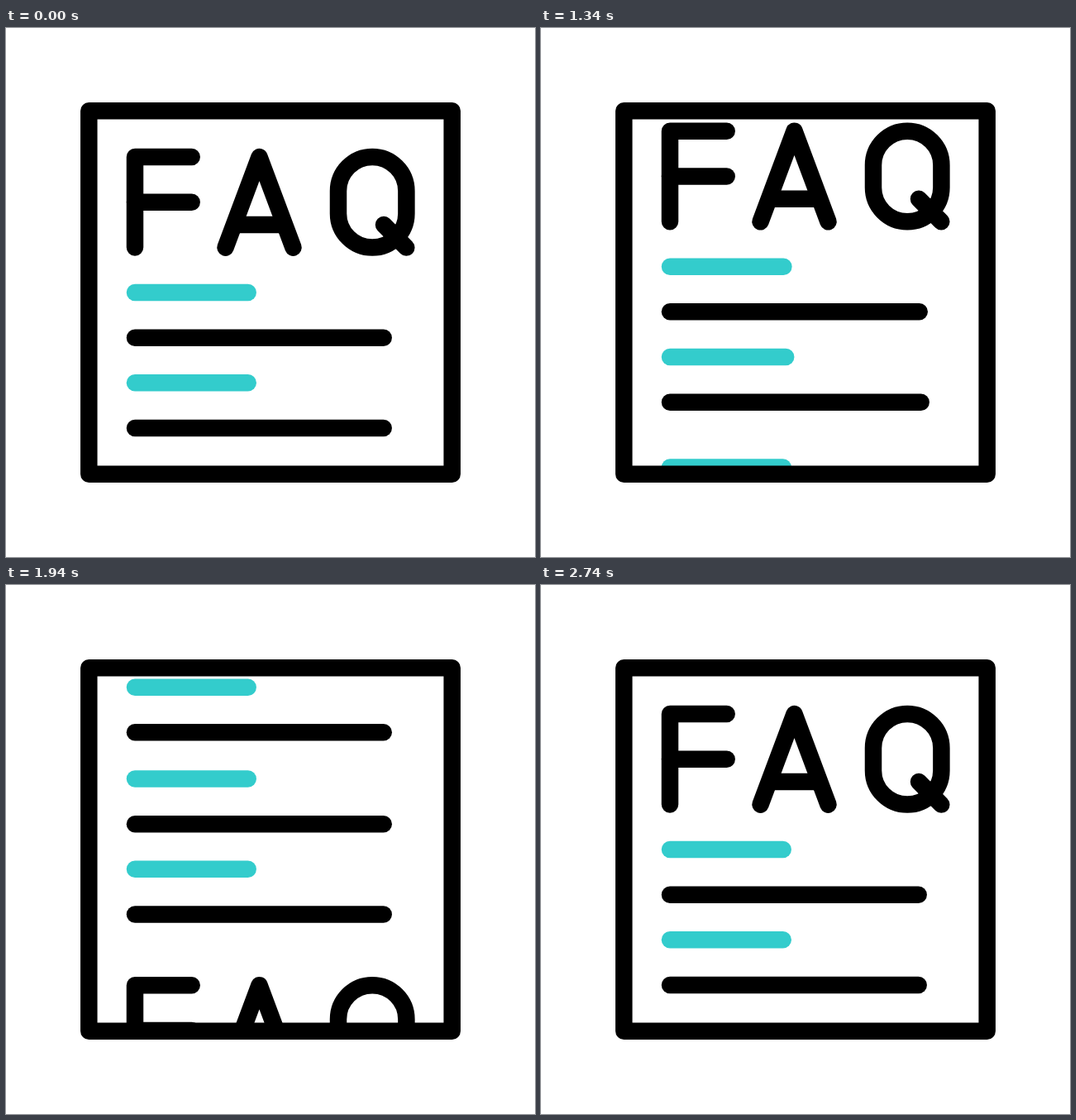
Animation of 640 by 640 pixels, one loop 3.02 s. Source, as an HTML page with a canvas:

```html
<!DOCTYPE html>
<html lang="en">
<head>
<meta charset="utf-8">
<title>FAQ page</title>
<style>
  html, body { margin: 0; width: 100%; height: 100%; overflow: hidden; background: #fff; }
  canvas { display: block; width: 640px; height: 640px; }
</style>
</head>
<body>
<canvas id="stage" width="640" height="640"></canvas>
<script>
const ctx = document.getElementById('stage').getContext('2d');
const LOOP = 3020, STEP = 20, INTRO_START = 60;
const BLACK = '#000', TEAL = '#33cccc';
const LEFT = 156, PITCH = 54.65, FIRST_LINE = 320;

// Text rows: right end, and how the right end settles (time, cubic factor).
const rows = [
  { color: TEAL,  end: 292.7, settle: 1474, pull: 2.89e-7 },
  { color: BLACK, end: 456.7, settle: 1503, pull: 2.31e-7 },
  { color: TEAL,  end: 292.7, settle: 1533, pull: 4.9e-7 },
  { color: BLACK, end: 456.7, settle: 1602, pull: 1.67e-7 }
];

// Scroll keys: time, offset, speed.
const firstScroll = [[900, 0, 0], [1020, -1, -.03], [1340, -31.3, -.24],
                     [1660, -164.7, -.47], [1940, -305.6, -.52], [2300, -500, -.5]];
const secondScroll = [[1200, 245, -.15], [1340, 211.5, -.28], [1660, 78.3, -.5],
                      [1940, -85.5, -.66], [2420, -410, -.6]];
const lastScroll = [[1660, 570, -.75], [1940, 328.2, -.95], [2420, 22.8, -.17], [2740, 0, 0]];

const clamp = v => Math.min(1, Math.max(0, v));
const smooth = (t, from, to) => {
  const p = clamp((t - from) / (to - from));
  return p * p * (3 - 2 * p);
};

function track(keys, t) {
  if (t <= keys[0][0]) return keys[0][1];
  for (let i = 1; i < keys.length; i++) {
    const [t0, y0, v0] = keys[i - 1], [t1, y1, v1] = keys[i];
    if (t > t1) continue;
    const d = t1 - t0, s = (t - t0) / d, r = 1 - s;
    return y0 * (1 + 2 * s) * r * r + v0 * d * s * r * r
         + y1 * s * s * (3 - 2 * s) - v1 * d * s * s * r;
  }
  return keys[keys.length - 1][1];
}

function polyline(points) {
  const path = new Path2D();
  let length = 0;
  points.forEach(([x, y], i) => {
    if (!i) return path.moveTo(x, y);
    path.lineTo(x, y);
    length += Math.hypot(x - points[i - 1][0], y - points[i - 1][1]);
  });
  return { path, length };
}

function bowl() {
  const r = 41.2, x = 443.2, top = 197.2, bottom = 224.4;
  const path = new Path2D();
  path.arc(x, top, r, Math.PI, 0);
  path.arc(x, bottom, r, 0, Math.PI);
  path.closePath();
  return { path, length: 2 * Math.PI * r + 2 * (bottom - top) };
}

const border = polyline([[100.3, 100.3], [539.7, 100.3], [539.7, 539.7], [100.3, 539.7], [100.3, 100.3]]);
const letters = [
  polyline([[156, 265.6], [156, 156], [224.7, 156]]),
  polyline([[156, 210.7], [224.7, 210.7]]),
  polyline([[265.5, 265.6], [306.5, 156], [347.5, 265.6]]),
  polyline([[277, 238], [336, 238]]),
  bowl(),
  polyline([[457, 238], [484.3, 265.6]])
];

function draw(shape, amount, color = BLACK) {
  if (amount <= 0) return;
  ctx.strokeStyle = color;
  ctx.setLineDash(amount < 1 ? [shape.length * amount, shape.length * 2] : []);
  ctx.stroke(shape.path);
}

function drawRow(row, i, from, to) {
  const y = FIRST_LINE + i * PITCH;
  draw(polyline([[from, y], [to, y]]), 1, row.color);
}

function shifted(dy, paint) {
  ctx.save();
  ctx.translate(0, dy);
  paint();
  ctx.restore();
}

const drawRows = () => rows.forEach((row, i) => drawRow(row, i, LEFT, row.end));
const drawLetters = amount => letters.forEach(shape => draw(shape, amount));

function introRows(t) {
  rows.forEach((row, i) => {
    const rest = 1 - clamp((t - INTRO_START) / (560 + 40 * i));
    const from = LEFT + 420 * rest ** 3;
    const to = row.end + row.pull * Math.max(0, row.settle - t) ** 3;
    drawRow(row, i, from, Math.max(from, to));
  });
}

function render(t) {
  const still = t < INTRO_START;
  ctx.fillStyle = '#fff';
  ctx.fillRect(0, 0, 640, 640);
  ctx.lineWidth = 20.5;
  ctx.lineCap = ctx.lineJoin = 'round';

  ctx.save();
  ctx.beginPath();
  ctx.rect(105, 105, 430, 430);
  ctx.clip();
  if (t < 2300) {
    shifted(track(firstScroll, t), () => {
      drawLetters(still ? 1 : smooth(t, 40, 900));
      still ? drawRows() : introRows(t);
    });
  }
  if (t > 1200 && t < 2420) shifted(track(secondScroll, t), drawRows);
  if (t > 1660) {
    shifted(track(lastScroll, t), () => {
      drawLetters(1);
      drawRows();
    });
  }
  ctx.restore();

  draw(border, still ? 1 : smooth(t, 20, 960));
}

const start = performance.now();
function tick() {
  const t = (performance.now() - start) % LOOP;
  render(Math.floor(t / STEP) * STEP);
  requestAnimationFrame(tick);
}
tick();
</script>
</body>
</html>
```
